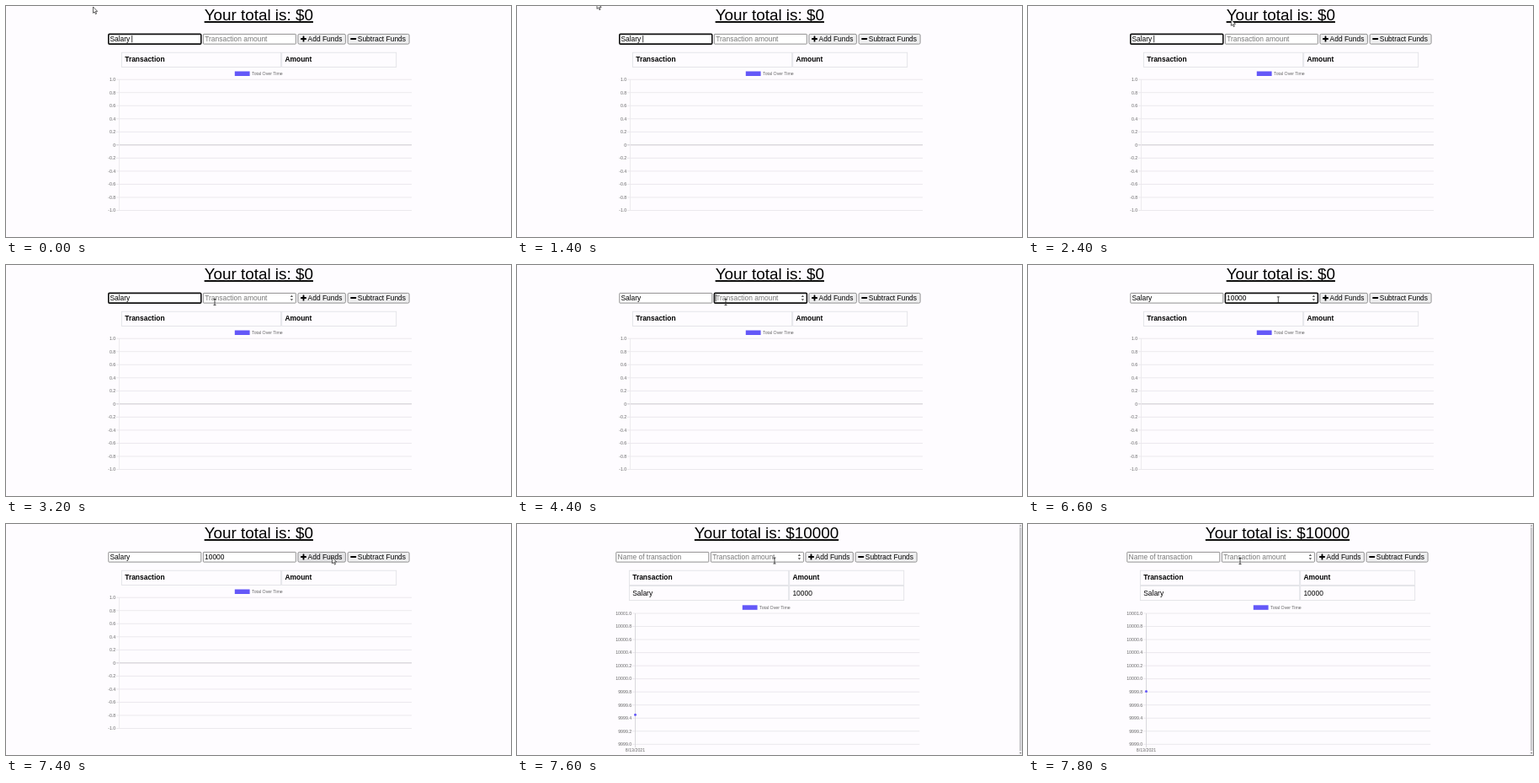
These frames come from a looping animation (600 by 274 pixels, 8000 ms). An HTML page:

```html
<!DOCTYPE html>
<html lang="en">
<head>
<meta charset="utf-8">
<title>Budget tracker</title>
<style>
html, body { margin: 0; width: 100%; height: 100%; overflow: hidden; background: #fefcff; }
svg { display: block; width: 600px; height: 274px; }
text { font: 8.45px "Liberation Sans", Arial, sans-serif; fill: #000; white-space: pre; }
.head { font-size: 18.86px; text-decoration: underline; text-anchor: middle; }
.bold { font-weight: bold; }
.hint { fill: #777; }
.tick { font-size: 5.25px; fill: #666; }
.end { text-anchor: end; }
.mid { text-anchor: middle; }
</style>
</head>
<body>
<svg id="stage" viewBox="0 0 600 274" xmlns="http://www.w3.org/2000/svg"></svg>
<script>
const LOOP = 8000, STEP = 200, ACCENT = '#6458f8';
const CLICKED = 7400, ADDED = 7600, CHART_START = 7460;
const stage = document.getElementById('stage');

// Pointer path: time, x, y
const path = [
  [0, 103.5, 1], [400, 103.5, 1], [1000, 84, 1], [1400, 95, -4],
  [1600, 100, -20], [2000, 232, -20], [2200, 237, 6], [2800, 250, 36],
  [3200, 248, 44], [6200, 248, 44], [6800, 322, 40], [7200, 386, 39.5],
  [7400, 387.5, 39.5], [7600, 306, 43.5], [7800, 252, 44]
];

const text = (x, y, s, cls = '') => `<text x="${x}" y="${y}" class="${cls}">${s}</text>`;
const rect = (x, y, w, h, fill, more = '') =>
  `<rect x="${x}" y="${y}" width="${w}" height="${h}" fill="${fill}" ${more}/>`;
const line = (x1, y1, x2, y2, color, w = 1) =>
  `<path d="M${x1} ${y1}L${x2} ${y2}" stroke="${color}" stroke-width="${w}"/>`;
const within = (t, ...spans) => spans.some(([a, b]) => t >= a && t < b);

function pointer(t) {
  let i = path.findIndex(p => p[0] > t);
  if (i < 0) return path[path.length - 1].slice(1);
  const [t0, x0, y0] = path[i - 1], [t1, x1, y1] = path[i];
  const k = (t - t0) / (t1 - t0);
  return [x0 + (x1 - x0) * k, y0 + (y1 - y0) * k];
}

function input(x, value, hint, focus, caret, spin) {
  const border = focus
    ? 'stroke="#111" stroke-width="1.6" rx="1.2"'
    : 'stroke="#858585" stroke-width=".9" rx=".6"';
  let s = rect(x, 33.4, 110, 11.7, '#fff', border);
  s += value ? text(x + 1.6, 42, value) : text(x + 1.8, 42, hint, 'hint');
  if (caret) s += line(caret, 35, caret, 43.3, '#111', .8);
  if (spin) {
    const c = x + 105;
    s += `<path d="M${c - 1.7} 38L${c} 35.8L${c + 1.7} 38ZM${c - 1.7} 40.2L${c} 42.4L${c + 1.7} 40.2Z" fill="#555"/>`;
  }
  return s;
}

function button(x, w, label, plus, hover) {
  const c = x + 6.6;
  return rect(x, 33.4, w, 11.7, hover ? '#e4e4e6' : '#efeff0', 'stroke="#858585" stroke-width=".9" rx="1.5"')
    + rect(c - 3.4, 38.1, 6.8, 1.8, '#000', 'rx=".5"')
    + (plus ? rect(c - .9, 35.6, 1.8, 6.8, '#000', 'rx=".5"') : '')
    + text(x + 11.7, 42, label);
}

function row(x, y, cells, cls) {
  const box = 'stroke="#e1e2e6" stroke-width=".9"';
  return rect(x, y, 189.3, 17.2, 'none', box) + rect(x + 190.3, y, 136, 17.2, 'none', box)
    + text(x + 3.8, y + 11.2, cells[0], cls) + text(x + 194, y + 11.2, cells[1], cls);
}

function chart(added, t) {
  const left = added ? 140.5 : 134.5, right = added ? 478.3 : 482;
  const top = added ? 106 : 87.2, gap = 15.53, bottom = top + gap * 10;
  const lx = added ? 267.8 : 271.8;
  let s = rect(lx, top - 9.7, 17.8, 5.5, ACCENT) + text(lx + 20.2, top - 5.2, 'Total Over Time', 'tick');
  for (let i = 0; i <= 10; i++) {
    const y = top + i * gap, v = 1 - i * .2;
    const zero = !added && i === 5;
    s += line(left - 4, y, right, y, zero ? '#c4c3c8' : '#e9e7eb', .9);
    const label = zero ? '0' : (v + (added ? 10000 : 0)).toFixed(1);
    s += text(left - 4.3, y + 1.8, label, 'tick end');
  }
  s += line(left, top, left, bottom + (added ? 4 : 0), added ? '#d5d4d9' : '#ebe9ed', .9);
  if (added) {
    const p = Math.min(1, (t - CHART_START) / 1000);
    const y = bottom - gap * 5 * (1 - (1 - p) ** 4);
    s += `<circle cx="${left}" cy="${y}" r="1.5" fill="${ACCENT}"/>`;
    s += text(left, 270.3, '8/13/2021', 'tick mid');
  }
  return s;
}

function cursor(x, y, beam) {
  if (beam) {
    return `<path d="M${x - 1.5} ${y - 3.5}h3M${x - 1.5} ${y + 3.5}h3M${x} ${y - 3.5}v7" fill="none" stroke="#222" stroke-width=".8"/>`;
  }
  return `<path transform="translate(${x} ${y})" d="M0 0V7.4L1.7 5.9L2.9 8.6L4.1 8.1L2.9 5.4H5.2Z" fill="#fff" stroke="#222" stroke-width=".7" stroke-linejoin="round"/>`;
}

function typed(t) {
  if (t < 4800) return '';
  return '10000'.slice(0, t >= 5800 ? 5 : Math.min(4, (t - 4800) / STEP + 1));
}

function render(t) {
  const added = t >= ADDED, dx = added ? -4 : 0;
  const [mx, my] = pointer(t);
  const inRow = my > 33 && my < 46;
  const over = (x, w) => inRow && mx > x + dx && mx < x + dx + w;
  const overAmount = over(234.4, 110);
  const nameFocus = t < 3400, amountFocus = t >= 3400 && t < CLICKED;
  const amount = added ? '' : typed(t);
  const nameCaret = within(t, [0, 1800], [2200, 2800]) && 149.7;
  const amountCaret = within(t, [3400, 3800], [4400, 6400], [7000, 7200])
    && 236.2 + amount.length * 4.7;

  let s = rect(0, 0, 600, 274, '#fefcff');
  s += text(added ? 296.5 : 300.3, 17, 'Your total is: $' + (added ? 10000 : 0), 'head');
  s += input(121.8 + dx, added ? '' : 'Salary', 'Name of transaction', nameFocus, nameCaret, false);
  s += input(234.4 + dx, amount, 'Transaction amount', amountFocus, amountCaret, amountFocus || overAmount);
  s += button(346.9 + dx, 56.5, 'Add Funds', true, over(346.9, 56.5));
  s += button(406.1 + dx, 73, 'Subtract Funds', false, over(406.1, 73));
  s += row(137.4 + dx, 55.2, ['Transaction', 'Amount'], 'bold');
  if (added) s += row(137.4 + dx, 73.4, ['Salary', '10000']);
  s += chart(added, t);
  if (added) {
    s += rect(596.4, 0, 3.6, 274, '#f1f0f3') + rect(597, 4, 2.4, 265, '#c9c8cc');
    s += '<path d="M597 2.6L598.2 1.2L599.4 2.6ZM597 271L598.2 272.4L599.4 271Z" fill="#666"/>';
  }
  s += cursor(mx, my, overAmount || over(121.8, 110));
  stage.innerHTML = s;
}

let shown = -1;
function tick(now) {
  const t = Math.floor((now % LOOP) / STEP) * STEP;
  if (t !== shown) render(shown = t);
  requestAnimationFrame(tick);
}
tick(performance.now());
</script>
</body>
</html>
```
